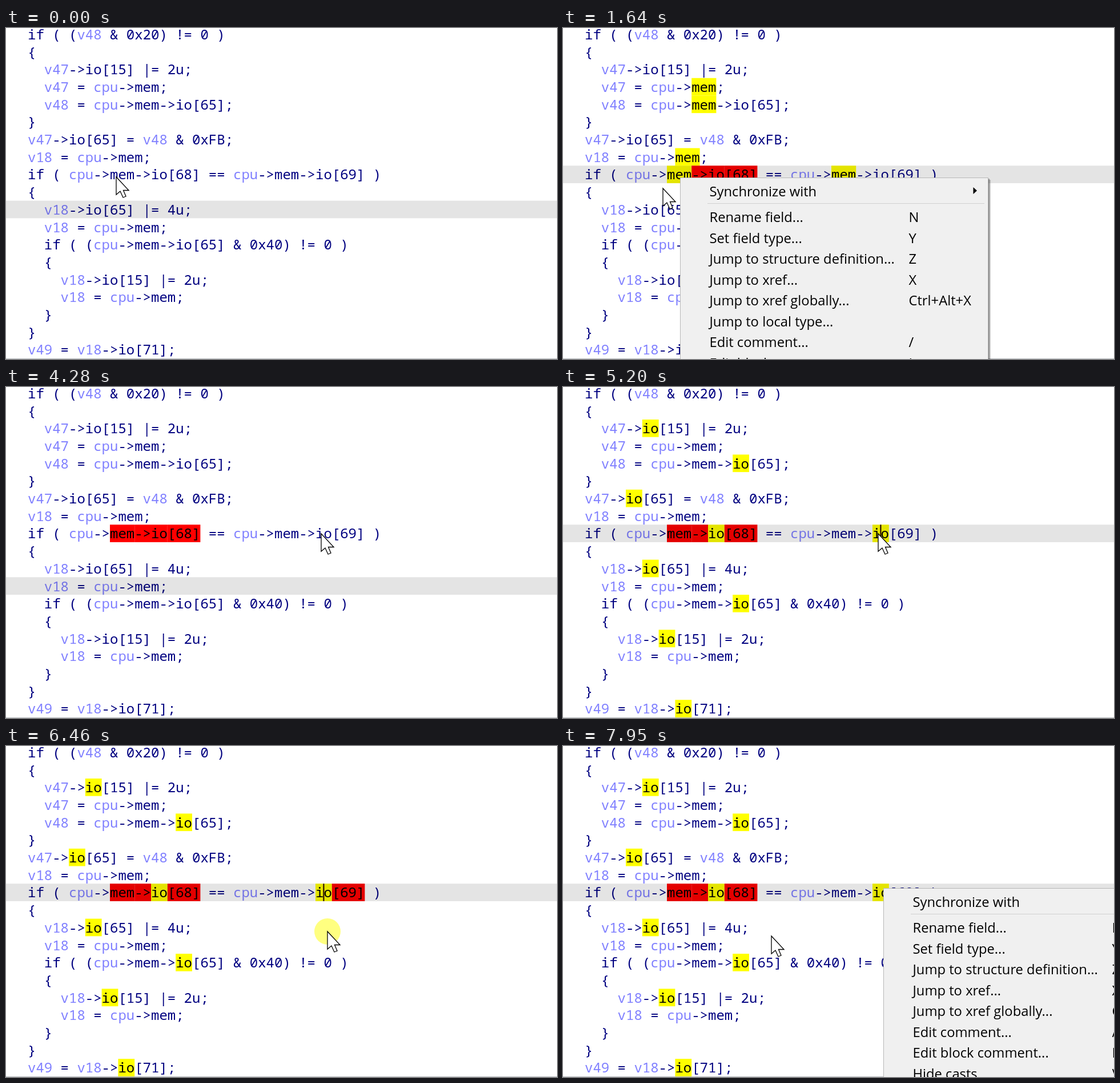
Recreate the animation shown at these times as an HTML page with a canvas. Size 965x580 px, loop 8000 ms.

```html
<!DOCTYPE html>
<html>
<head>
<meta charset="utf-8">
<style>
html, body { margin: 0; width: 100%; height: 100%; overflow: hidden; background: #fff; }
canvas { display: block; }
</style>
</head>
<body>
<canvas id="stage" width="965" height="580"></canvas>
<script>
const W = 965, H = 580, LOOP = 8000;
const LEFT = 38, CHAR = 14.4, TOP = -4.4, ROW = 30.7, IF_ROW = 8, BLINK = 530;
const ctx = document.getElementById('stage').getContext('2d');

const code = `if ( (v48 & 0x20) != 0 )
{
  v47->io[15] |= 2u;
  v47 = cpu->mem;
  v48 = cpu->mem->io[65];
}
v47->io[65] = v48 & 0xFB;
v18 = cpu->mem;
if ( cpu->mem->io[68] == cpu->mem->io[69] )
{
  v18->io[65] |= 4u;
  v18 = cpu->mem;
  if ( (cpu->mem->io[65] & 0x40) != 0 )
  {
    v18->io[15] |= 2u;
    v18 = cpu->mem;
  }
}
v49 = v18->io[71];`.split('\n');

const items = [
  ['Rename field...', 'N'], ['Set field type...', 'Y'],
  ['Jump to structure definition...', 'Z'], ['Jump to xref...', 'X'],
  ['Jump to xref globally...', 'Ctrl+Alt+X'], ['Jump to local type...', ''],
  ['Edit comment...', '/'], ['Edit block comment...', 'Ins'], ['Hide casts', '\\']
];

// pointer moves; it rests where each one ends
const moves = [
  { from: 0, to: 1, x: 193, y: 261 },
  { from: 90, to: 320, x: 205, y: 262 },
  { from: 1530, to: 1640, x: 175, y: 281 },
  { from: 1950, to: 2220, x: 587, y: 338 },
  { from: 3580, to: 3820, x: 537, y: 262 },
  { from: 3950, to: 4280, x: 552, y: 257 },
  { from: 5750, to: 5840, x: 505, y: 295 },
  { from: 6000, to: 6210, x: 563, y: 325 },
  { from: 6800, to: 7330, x: 561, y: 250 },
  { from: 7650, to: 7930, x: 365, y: 333 }
];
const wander = { from: 2740, to: 3510 };
const clicks = [1870, 2270, 5850, 6460];

// line and word under the text cursor
const states = [
  { from: 0, row: 10 },
  { from: 470, row: IF_ROW, word: 'mem' },
  { from: 2380, row: 11 },
  { from: 5060, row: IF_ROW, word: 'io' },
  { from: 6540, row: 10 },
  { from: 7480, row: IF_ROW, word: 'io' }
];
const menus = [
  { from: 1010, to: 1870, x: 205, y: 262, word: 'mem' },
  { from: 5610, to: 5850, x: 552, y: 257, word: 'io' },
  { from: 7640, to: LOOP, x: 561, y: 249, word: 'io' }
];
const marks = [
  { from: 1090, to: LOOP, text: 'mem->io[68]' },
  { from: 5760, to: 7640, text: 'io[69]' }
];

const progress = (t, o) => Math.max(0, Math.min(1, (t - o.from) / (o.to - o.from)));
const ease = k => k * k * (3 - 2 * k);
const colX = c => LEFT + c * CHAR;
const rowY = r => TOP + r * ROW;

function rect(x, y, w, h, color) {
  ctx.fillStyle = color;
  ctx.fillRect(x, y, w, h);
}

function text(s, x, y, color) {
  ctx.fillStyle = color;
  ctx.fillText(s, x, y);
}

function polygon(x, y, points) {
  ctx.beginPath();
  points.forEach(([dx, dy]) => ctx.lineTo(x + dx, y + dy));
  ctx.closePath();
}

function pointerAt(t) {
  let x = 0, y = 0;
  for (const m of moves) {
    const k = ease(progress(t, m));
    x += (m.x - x) * k;
    y += (m.y - y) * k;
  }
  const a = 2 * Math.PI * ease(progress(t, wander));
  return [x + 90 * (1 - Math.cos(a)) + 120 * Math.sin(a), y + 60 * Math.sin(a)];
}

function drawCode(state, t, menuOpen) {
  ctx.font = '24px "Noto Sans Mono", monospace';
  code.forEach((line, r) => {
    for (const m of line.matchAll(/\b(v\d+|cpu)\b|\S+?(?=\bv\d|\bcpu\b|\s|$)/g))
      text(m[0], colX(m.index), rowY(r) + 24.2, m[1] ? '#8080ff' : '#000080');
  });

  // backgrounds tint the text beneath them
  ctx.globalCompositeOperation = 'multiply';
  const band = (r, col, n, color) => rect(colX(col), rowY(r), n * CHAR, ROW, color);
  rect(0, rowY(state.row), W, ROW, '#e4e4e4');
  for (const m of marks) {
    if (t < m.from || t >= m.to) continue;
    let col = code[IF_ROW].indexOf(m.text);
    for (const part of m.text.split(/(mem|io)/)) {
      if (part !== state.word) band(IF_ROW, col, part.length, '#ff0000');
      col += part.length;
    }
  }
  if (state.word) code.forEach((line, r) => {
    for (const m of line.matchAll(new RegExp(`\\b${state.word}\\b`, 'g')))
      band(r, m.index, state.word.length, '#ffff00');
  });
  ctx.globalCompositeOperation = 'source-over';

  const shown = Math.floor((t - state.from) / BLINK) % 2 === 0;
  if (state.from && shown && !menuOpen) {
    const col = Math.round((pointerAt(state.from)[0] - LEFT) / CHAR);
    rect(colX(col) - 1, rowY(state.row), 2, ROW, '#200000');
  }
  rect(0, 579, W, 1, '#b4b8bc');
}

function drawMenu({ x, y, word }) {
  rect(x + 4, y + 4, 540, H, 'rgba(0,0,0,.2)');
  rect(x + 2, y + 2, 540, H, 'rgba(0,0,0,.3)');
  rect(x, y, 540, H, '#b8b8b8');
  rect(x + 1, y + 1, 538, H, '#f0f0f0');
  rect(x + 48, y + 45, 485, 1, '#d0d0d0');
  ctx.font = '23.75px "Open Sans", sans-serif';
  text('Synchronize with', x + 51.5, y + 33, '#000');
  polygon(x + 513.5, y + 17, [[0, 0], [6.5, 6], [0, 12]]);
  ctx.fill();
  items.filter(([label]) => word === 'mem' || !label.includes('local')).forEach(([label, key], i) => {
    const base = y + 78.3 + i * 36.5;
    text(label, x + 51.5, base, '#000');
    text(key, x + 400.5, base, '#000');
  });
}

function drawPointer(x, y) {
  polygon(x, y, [[0, 0], [0, 31], [7, 25], [12, 36], [17, 34], [12.5, 23.5], [22, 23.5]]);
  ctx.fillStyle = '#fff';
  ctx.fill();
  ctx.lineWidth = 1.3;
  ctx.strokeStyle = '#000';
  ctx.stroke();
}

function drawClick(t, x, y) {
  const age = t - clicks.findLast(c => c <= t);
  if (!(age < 340)) return;
  ctx.globalAlpha = Math.min(1, (340 - age) / 260);
  ctx.globalCompositeOperation = 'multiply';
  ctx.fillStyle = '#ffff80';
  ctx.beginPath();
  ctx.arc(x, y, 23, 0, 2 * Math.PI);
  ctx.fill();
  ctx.globalCompositeOperation = 'source-over';
  ctx.globalAlpha = 1;
}

function draw(t) {
  const menu = menus.find(m => t >= m.from && t < m.to);
  const [x, y] = pointerAt(t);
  rect(0, 0, W, H, '#fff');
  drawCode(states.findLast(s => s.from <= t), t, menu);
  if (menu) drawMenu(menu);
  drawClick(t, x, y);
  drawPointer(x, y);
}

const begin = performance.now();
function tick() {
  draw((performance.now() - begin) % LOOP);
  requestAnimationFrame(tick);
}
// place the pointer at its first position from the very start
moves[0].from = -1;
moves[0].to = 0;
tick();
</script>
</body>
</html>
```
